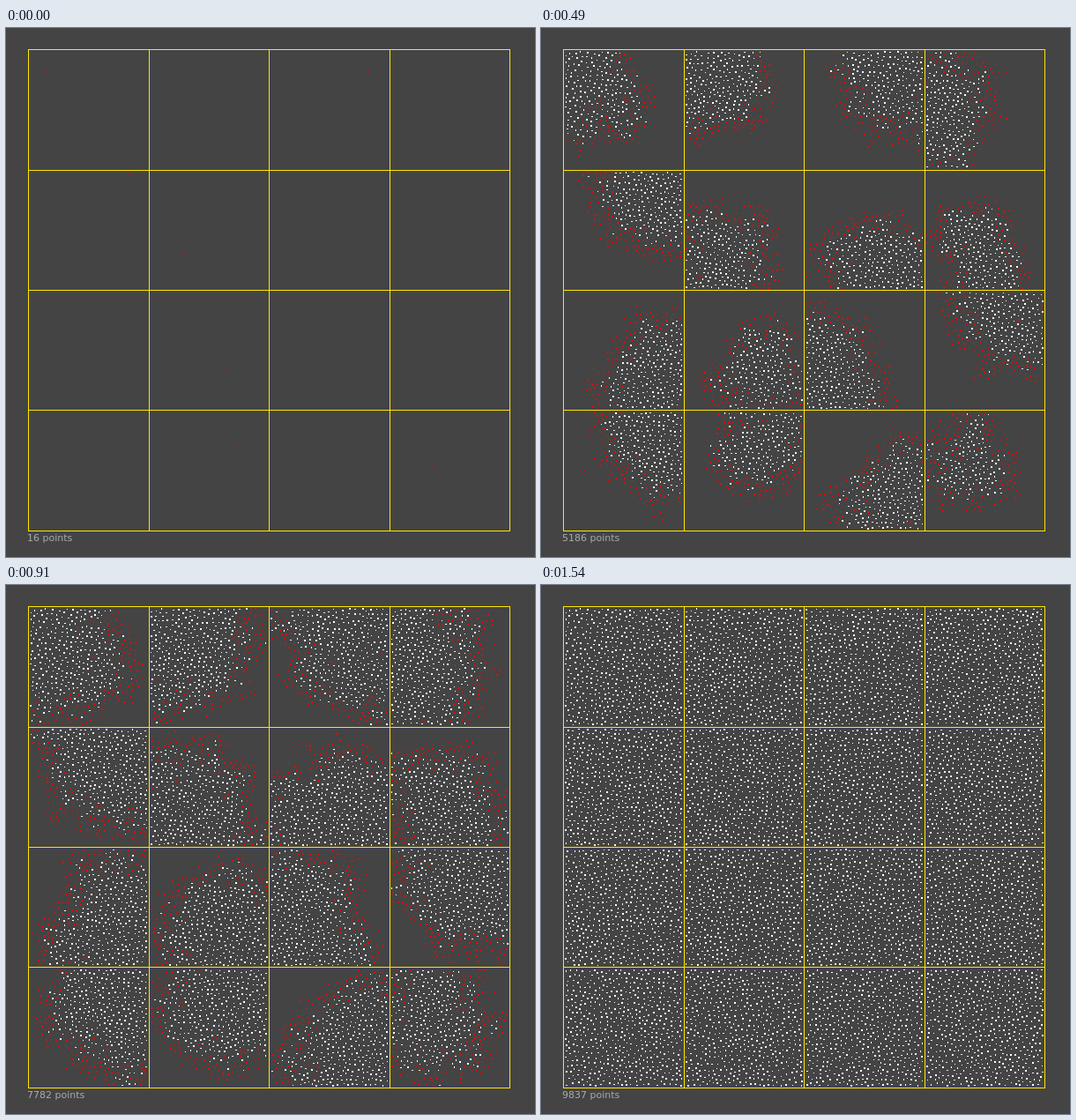
An HTML page with a canvas for the animation above (3.54 s loop, 600 px wide and 600 px high).

```html
<!DOCTYPE html>
<html lang="en">
<head>
<meta charset="utf-8">
<title>Poisson-disc tiles</title>
<style>
  html, body { margin: 0; width: 100%; height: 100%; overflow: hidden; background: #444; }
  canvas { display: block; width: 600px; height: 600px; }
</style>
</head>
<body>
<canvas id="stage" width="600" height="600"></canvas>
<script>
const ctx = document.getElementById('stage').getContext('2d');

const STEP = 70, LOOP = 3540;
const LEFT = 25, TOP = 24, TILE = 136.5;
const PAD = 2.75, SIZE = 131.5, RADIUS = 4.45, TRIES = 30;
const WHITE = '#fff', RED = '#f00', YELLOW = '#ffe600';

// Points placed after each step, all tiles together.
const COUNTS = [16, 906, 1797, 2687, 3520, 4352, 4772, 5186, 5594, 5998, 6440, 6886,
  7336, 7782, 8160, 8495, 8795, 9060, 9295, 9490, 9645, 9760, 9837];
const LAST = COUNTS.length - 1;

// One seed per tile, row by row.
const SEEDS = [
  [46, 48], [188, 58], [411, 50], [455, 98],
  [138, 166], [200, 257], [398, 268], [498, 277],
  [150, 398], [250, 385], [322, 396], [536, 332],
  [140, 446], [258, 474], [412, 541], [486, 497]
];

function makeRandom(seed) {
  return () => {
    seed = (seed + 0x6D2B79F5) | 0;
    let v = Math.imul(seed ^ (seed >>> 15), 1 | seed);
    v = (v + Math.imul(v ^ (v >>> 7), 61 | v)) ^ v;
    return ((v ^ (v >>> 14)) >>> 0) / 4294967296;
  };
}

// Bridson sampling; each point remembers the count at which it went inactive.
function growTile(seed, index) {
  const random = makeRandom(index * 977 + 41);
  const x0 = LEFT + TILE * (index % 4) + PAD;
  const y0 = TOP + TILE * Math.floor(index / 4) + PAD;
  const cell = RADIUS / Math.SQRT2;
  const cols = Math.ceil(SIZE / cell);
  const grid = new Array(cols * cols);
  const points = [], active = [];

  function add(x, y) {
    const p = { x, y, done: Infinity };
    points.push(p);
    active.push(p);
    grid[Math.floor((y - y0) / cell) * cols + Math.floor((x - x0) / cell)] = p;
  }

  function isFree(x, y) {
    if (x < x0 || y < y0 || x >= x0 + SIZE || y >= y0 + SIZE) return false;
    const cx = Math.floor((x - x0) / cell), cy = Math.floor((y - y0) / cell);
    for (let j = Math.max(0, cy - 2); j <= Math.min(cols - 1, cy + 2); j++) {
      for (let i = Math.max(0, cx - 2); i <= Math.min(cols - 1, cx + 2); i++) {
        const p = grid[j * cols + i];
        if (p && (p.x - x) ** 2 + (p.y - y) ** 2 < RADIUS * RADIUS) return false;
      }
    }
    return true;
  }

  function spawn(parent) {
    for (let k = 0; k < TRIES; k++) {
      const angle = random() * Math.PI * 2;
      const dist = RADIUS * Math.sqrt(1 + 3 * random());
      const x = parent.x + dist * Math.cos(angle);
      const y = parent.y + dist * Math.sin(angle);
      if (isFree(x, y)) {
        add(x, y);
        return true;
      }
    }
    return false;
  }

  add(seed[0], seed[1]);
  while (active.length) {
    const i = Math.floor(random() * active.length);
    if (!spawn(active[i])) {
      active[i].done = points.length;
      active[i] = active[active.length - 1];
      active.pop();
    }
  }
  return points;
}

const tiles = SEEDS.map(growTile);

function dot(p, color) {
  const x = Math.round(p.x - 0.5), y = Math.round(p.y - 0.5);
  ctx.fillStyle = color;
  ctx.fillRect(x, y, Math.round(p.x + 1.1) - x, Math.round(p.y + 1.1) - y);
}

function drawGrid() {
  ctx.fillStyle = YELLOW;
  for (let i = 0; i <= 4; i++) {
    ctx.fillRect(Math.round(LEFT + TILE * i), TOP, 1, TILE * 4 + 1);
    ctx.fillRect(LEFT, Math.floor(TOP + TILE * i + (i === 3 ? 0 : 0.5)), TILE * 4 + 1, 1);
  }
}

function draw(step) {
  ctx.fillStyle = '#444';
  ctx.fillRect(0, 0, 600, 600);
  drawGrid();
  const share = COUNTS[step] / COUNTS[LAST];
  for (const points of tiles) {
    const n = Math.max(1, Math.round(points.length * share));
    for (let i = 0; i < n; i++) dot(points[i], points[i].done <= n ? WHITE : RED);
  }
  ctx.fillStyle = '#aaa';
  ctx.font = '11px "DejaVu Sans", sans-serif';
  ctx.fillText(COUNTS[step] + ' points', 24, 582);
}

const start = performance.now();
let shown = -1;

function tick() {
  const time = (performance.now() - start) % LOOP;
  const step = Math.min(LAST, Math.floor(time / STEP));
  if (step !== shown) draw(shown = step);
  requestAnimationFrame(tick);
}
tick();
</script>
</body>
</html>
```
